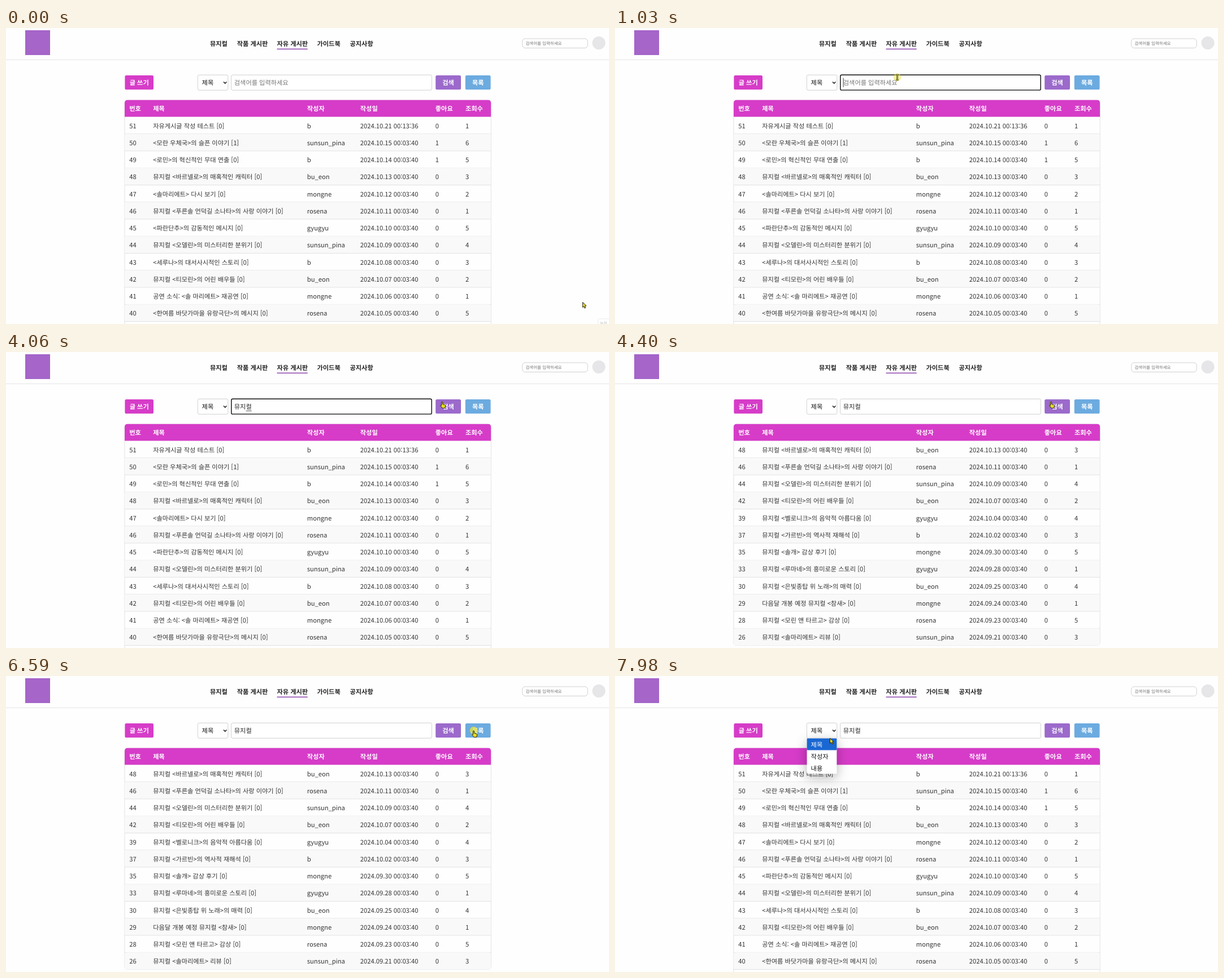
An HTML page for the animation above (8000 ms loop, 1067 px wide and 525 px high).

```html
<!DOCTYPE html>
<html lang="ko">
<head>
<meta charset="utf-8">
<title>자유 게시판</title>
<style>
  html, body { margin: 0; width: 100%; height: 100%; overflow: hidden; background: #fefefe; }
  svg { display: block; width: 100%; height: 100%; }
  text {
    font: 11.2px "Noto Sans CJK KR", "Noto Sans KR", "Noto Sans CJK", sans-serif;
    text-rendering: geometricPrecision;
    fill: #333;
  }
  .b { font-weight: 700; }
  .w { fill: #fff; }
</style>
</head>
<body>
<svg id="stage" viewBox="0 0 1067 525"></svg>
<script>
const LOOP = 8000;
const stage = document.getElementById('stage');

function add(parent, tag, attrs, content) {
  const node = document.createElementNS('http://www.w3.org/2000/svg', tag);
  for (const key in attrs) node.setAttribute(key, attrs[key]);
  if (content !== undefined) node.textContent = content;
  return parent.appendChild(node);
}
const rect = (p, x, y, width, height, fill, more) =>
  add(p, 'rect', { x, y, width, height, fill, ...more });
// y is the visual middle of the line
const label = (p, x, y, str, more) => add(p, 'text', { x, y: y + 4.2, ...more }, str);
const group = (p = stage) => add(p, 'g', {});
const show = (node, on) => node.setAttribute('visibility', on ? 'visible' : 'hidden');

// ---- page header ----
rect(stage, 0, 0, 1067, 525, '#fefefe');
rect(stage, 0, 55.9, 1067, 0.8, '#dedede');
rect(stage, 34, 4, 44, 44, '#a565c9');
[[361, '뮤지컬'], [408.7, '작품 게시판'], [479.5, '자유 게시판'], [550.5, '가이드북'], [608.5, '공지사항']]
  .forEach(([x, s]) => label(stage, x, 27.5, s, { class: 'b', style: 'fill:#222' }));
rect(stage, 479.5, 36.6, 54.2, 1.5, '#8e44ad');
rect(stage, 913.7, 18.9, 115.5, 16.6, '#fff', { rx: 5, stroke: '#c4c4c4', 'stroke-width': 0.8 });
add(stage, 'text', { x: 919.5, y: 30, style: 'font-size:7.47px;fill:#757575' }, '검색어를 입력하세요');
add(stage, 'circle', { cx: 1049, cy: 26.5, r: 11.5, fill: '#e6e5e8' });

// ---- search bar ----
function button(x, width, fill, str) {
  rect(stage, x, 84, width, 25.3, fill, { rx: 2.6 });
  label(stage, x + width / 2, 97, str, { class: 'b w', 'text-anchor': 'middle' });
}
const thin = { rx: 2.4, stroke: '#c6c6c6', 'stroke-width': 0.8 };
button(210.4, 50.6, '#d63cc8', '글 쓰기');
button(760.2, 44.8, '#9b6acb', '검색');
button(812.8, 44.8, '#6cabe0', '목록');
rect(stage, 339.4, 83.3, 53.4, 27, '#fff', thin);
label(stage, 346.6, 97, '제목', { style: 'fill:#111' });
add(stage, 'path', { d: 'M385 95.6l2.7 2.7l2.7-2.7', fill: 'none', stroke: '#111', 'stroke-width': 1.4 });
rect(stage, 398.6, 83.3, 354.8, 27, '#fff', thin);
const focusRing = rect(stage, 398.8, 83.3, 354.4, 26.8, 'none', { rx: 2.2, stroke: '#101010', 'stroke-width': 1.4 });
const inputText = label(stage, 403.8, 97, '');
const underline = rect(stage, 0, 103.9, 10, 0.8, '#222');
const caret = rect(stage, 0, 88.6, 0.9, 16.2, '#222');

// ---- table ----
const COLS = [218.3, 260.2, 532.8, 626.8, 759.8, 813];
const TOP = 157.5, ROW = 30.25;
const USERS = { s: 'sunsun_pina', d: 'bu_eon', w: 'mongne', r: 'rosena', g: 'gyugyu', b: 'b' };

const allPosts = [
  [51, '자유게시글 작성 테스트', 'b', 1],
  [50, '<모란 우체국>의 슬픈 이야기', 's', 6],
  [49, '<로민>의 혁신적인 무대 연출', 'b', 5],
  [48, '뮤지컬 <바르넬로>의 매혹적인 캐릭터', 'd', 3],
  [47, '<솔마리에트> 다시 보기', 'w', 2],
  [46, '뮤지컬 <푸른솔 언덕길 소나타>의 사랑 이야기', 'r', 1],
  [45, '<파란단추>의 감동적인 메시지', 'g', 5],
  [44, '뮤지컬 <오델린>의 미스터리한 분위기', 's', 4],
  [43, '<세루나>의 대서사시적인 스토리', 'b', 3],
  [42, '뮤지컬 <티모린>의 어린 배우들', 'd', 2],
  [41, '공연 소식: <솔 마리에트> 재공연', 'w', 1],
  [40, '<한여름 바닷가마을 유랑극단>의 메시지', 'r', 5]
];
const foundPosts = allPosts.filter(p => p[1].startsWith('뮤지컬')).concat([
  [39, '뮤지컬 <벨로니크>의 음악적 아름다움', 'g', 4],
  [37, '뮤지컬 <가르빈>의 역사적 재해석', 'b', 3],
  [35, '뮤지컬 <솔개> 감상 후기', 'w', 5],
  [33, '뮤지컬 <루마네>의 흥미로운 스토리', 'g', 1],
  [30, '뮤지컬 <은빛종탑 위 노래>의 매력', 'd', 4],
  [29, '다음달 개봉 예정 뮤지컬 <참새>', 'w', 1],
  [28, '뮤지컬 <모린 앤 타르고> 감상', 'r', 5],
  [26, '뮤지컬 <솔마리에트> 리뷰', 's', 3]
]);

function postDate(id) {
  if (id === 51) return '2024.10.21 00:13:36';
  const [month, day] = id > 35 ? ['10', id - 35] : ['09', id - 5];
  return `2024.${month}.${String(day).padStart(2, '0')} 00:03:40`;
}

function table(posts, height) {
  const g = group();
  rect(g, 209.9, 128, 648.4, height, '#fefefe', { rx: 5, stroke: '#dcdcdc', 'stroke-width': 0.8 });
  posts.forEach(([id, title, user, views], i) => {
    const y = TOP + i * ROW;
    if (i % 2) rect(g, 210.3, y, 647.6, ROW, '#f9f9f9', { rx: i === 11 ? 4 : 0 });
    if (i < 11 || height > 393) rect(g, 210, y + ROW - 0.4, 648, 0.8, '#dcdcdc');
    const liked = id === 50 || id === 49 ? 1 : 0;
    const cells = [id, `${title} [${id === 50 ? 1 : 0}]`, USERS[user], postDate(id), liked, views];
    cells.forEach((s, c) => label(g, COLS[c], y + 16, s));
  });
  return g;
}
const allTable = table(allPosts, 420);
const foundTable = table(foundPosts, 392.6);
add(stage, 'path', { d: 'M210 157.4V133q0-5.2 5.2-5.2H852.9q5.2 0 5.2 5.2v24.4z', fill: '#d63cc8' });
['번호', '제목', '작성자', '작성일', '좋아요', '조회수']
  .forEach((s, c) => label(stage, COLS[c], 143, s, { class: 'b w' }));

// ---- corner badge ----
const badge = group();
rect(badge, 1047.4, 515.8, 24, 14, '#fefefe', { rx: 2, stroke: '#e8e8e8', 'stroke-width': 0.8 });
add(badge, 'text', { x: 1051, y: 525.6, style: 'font-size:7px;fill:#c8c8c8' }, '녹화');

// ---- select menu ----
const menu = group();
menu.style.filter = 'drop-shadow(0 6px 10px rgba(0,0,0,.3))';
rect(menu, 339.6, 110.8, 52.8, 62.6, '#fff', { rx: 2 });
rect(menu, 339.6, 110.8, 52.8, 20.8, '#1967d2', { rx: 1 });
['제목', '작성자', '내용'].forEach((s, i) =>
  label(menu, 346.6, 121.7 + i * 20.8, s, { style: `fill:${i ? '#111' : '#fff'}` }));

// ---- pointer ----
const halo = add(stage, 'circle', { r: 6.8, fill: '#e6e23c' });
const pointer = group();
const outline = { fill: '#e6da22', stroke: '#262618', 'stroke-width': 1, 'stroke-linejoin': 'round' };
const shapes = {
  arrow: add(pointer, 'path', { d: 'M.4.4V9.6L2.5 7.7L4 11L5.6 10.3L4.2 7.1L7 6.8z', ...outline }),
  hand: add(pointer, 'path', { d: 'M-1 1q1-1.2 2 0v4l3.8 1q1.5.5 1.2 2l-.8 4h-4.6l-3.4-4.2q.1-1.6 1.8-.4z', ...outline }),
  beam: group(pointer)
};
['#33331c 2.4', '#e6da22 .8'].forEach(s => {
  const [stroke, width] = s.split(' ');
  add(shapes.beam, 'path', { d: 'M-2-4.5h4M0-4.5v9M-2 4.5h4', fill: 'none', stroke, 'stroke-width': width });
});

// time, x, y, upward bow of the way there
const WAY = [
  [0, 1020, 486], [70, 1020, 486], [820, 502, 92], [890, 502, 92], [1020, 499.5, 87.5],
  [1090, 499.5, 87.5], [1160, 501, 91], [3390, 501, 91], [4060, 771.5, 87.5, 26],
  [5660, 771.5, 87.5], [6000, 827.5, 96.5], [6740, 827.5, 96.5], [7350, 381, 103],
  [7890, 381, 103], [7975, 380, 110], [LOOP, 380, 110]
];
const CLICKS = [[890, 1150], [4200, 4390], [6590, 6720], [7420, 7560]];
const TYPING = [
  [890, ''], [1360, 'ㅁ'], [2220, '뮤'], [2440, '뮺'], [2550, '뮤지'],
  [2700, '뮤짘'], [2830, '뮤지커'], [3490, '뮤지컬']
];

function pointerAt(t) {
  const i = WAY.findIndex(k => k[0] > t);
  const [t0, x0, y0] = WAY[i - 1], [t1, x1, y1, bow = 0] = WAY[i];
  const p = (t - t0) / (t1 - t0), e = p * p * (3 - 2 * p);
  return [x0 + (x1 - x0) * e, y0 + (y1 - y0) * e - bow * 4 * e * (1 - e)];
}

function pointerKind(x, y) {
  if (y < 83 || y > 109.5) return 'arrow';
  if (x > 398 && x < 754) return 'beam';
  return (x > 760 && x < 805) || (x > 813 && x < 858) ? 'hand' : 'arrow';
}

function draw(t) {
  const focused = t >= 890 && t < 4230;
  const [typedAt, typed] = TYPING.filter(k => k[0] <= t).pop() || [0, ''];
  const end = 404 + typed.length * 10.3;
  inputText.textContent = typed || '검색어를 입력하세요';
  inputText.style.fill = typed ? '#222' : '#757575';
  show(focusRing, focused);
  show(underline, focused && typed);
  underline.setAttribute('x', end - 10.3);
  show(caret, focused && (t - typedAt) % 1060 < 530);
  caret.setAttribute('x', end - 0.4 + (typed ? 0.6 : 0));

  const filtered = t >= 4330 && t < 6720;
  show(allTable, !filtered);
  show(foundTable, filtered);
  show(badge, t < 200);

  const open = Math.min(1, Math.max(0, (t - 7460) / 160));
  show(menu, open > 0);
  menu.setAttribute('opacity', open);

  const [x, y] = pointerAt(t), kind = pointerKind(x, y);
  pointer.setAttribute('transform', `translate(${x} ${y})`);
  for (const name in shapes) show(shapes[name], name === kind);
  show(halo, CLICKS.some(([a, b]) => t >= a && t < b));
  halo.setAttribute('opacity', kind === 'beam' ? 0.5 : 0.75);
  halo.setAttribute('cx', x);
  halo.setAttribute('cy', y);
}

const start = performance.now();
function tick() {
  draw((performance.now() - start) % LOOP);
  requestAnimationFrame(tick);
}
tick();
</script>
</body>
</html>
```
